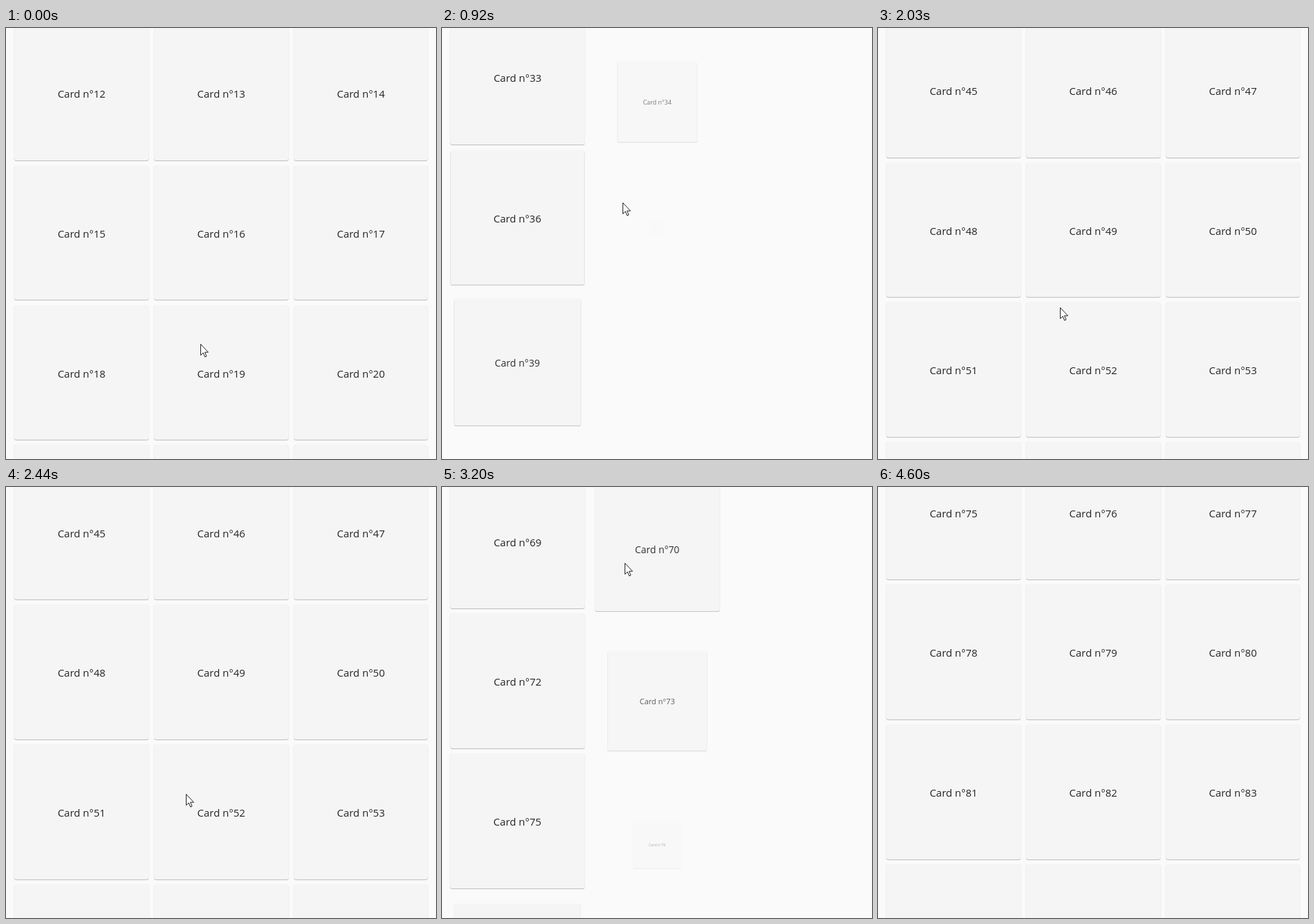
Write an HTML page that moves like this. It is 624 px wide and 625 px high and loops after 4660 ms.

```html
<!DOCTYPE html>
<html lang="en">
<head>
<meta charset="utf-8">
<style>
html, body { margin: 0; width: 100%; height: 100%; overflow: hidden; background: #fafafa; }
#stage { position: relative; width: 100%; height: 100%; overflow: hidden; }
.card {
  position: absolute; width: 194.667px; height: 194.667px; border-radius: 3px;
  background: #f5f5f5; color: #242424;
  box-shadow: 0 1px 1px rgba(0,0,0,.23), 0 0 2px rgba(0,0,0,.08);
  font: 15px/196px "Open Sans", "Noto Sans", sans-serif; text-align: center;
}
#pointer { position: absolute; left: 0; top: 0; z-index: 1; }
</style>
</head>
<body>
<div id="stage">
  <svg id="pointer" width="14" height="21">
    <path d="M.5.5V16.5L4.2 13L6.7 19L9 18L6.5 12.2H11.5Z" fill="#fff" stroke="#222"/>
  </svg>
</div>
<script>
const LOOP = 4660, PITCH = 202.667, FIRST_ROW = 3, LAST_ROW = 29;
const REVEAL = 250, ROW_DELAY = 56, COLUMN_DELAY = 200, SLIDE = 150;

// New rows arrive in pages of three, at these times
const FIRST_NEW_ROW = 8;
const pageTimes = [440, 656, 1010, 1300, 2640, 2855, 3050, 3400];

// Each flick is a pull that speeds up, then a cubic glide to rest
const flicks = [
  { start: 162, release: 370, end: 2531.8, from: 716.2, pull: 284.6, rest: 2974.3 },
  { start: 2460, release: 2620, end: 4194, from: 2974.3, pull: 274, rest: 5029.6 }
];

// Pointer path: time, x, y
const path = [
  [0, 282, 458], [162, 280, 458], [370, 268, 173], [920, 262, 253], [1500, 268, 350],
  [2440, 261, 447], [2620, 262, 173], [3200, 265, 110], [3750, 295, 334],
  [4290, 536, 581], [LOOP, 630, 640]
];

const clamp = v => Math.min(1, Math.max(0, v));

function scrollAt(t) {
  const { start, release, end, from, pull, rest } = flicks[t < flicks[1].start ? 0 : 1];
  if (t < release) return from + pull * clamp((t - start) / (release - start)) ** 2;
  return rest - (rest - from - pull) * clamp((end - t) / (end - release)) ** 3;
}

function pointerAt(t) {
  const i = path.findIndex(key => key[0] > t);
  const [t0, x0, y0] = path[i - 1], [t1, x1, y1] = path[i];
  const k = (t - t0) / (t1 - t0);
  return [x0 + (x1 - x0) * k, y0 + (y1 - y0) * k];
}

function revealAt(row, col, t) {
  const n = row - FIRST_NEW_ROW;
  if (n < 0) return 1;
  const start = pageTimes[Math.floor(n / 3)] + n % 3 * ROW_DELAY + col * COLUMN_DELAY;
  return 1 - (1 - clamp((t - start) / REVEAL)) ** 3;
}

const stage = document.getElementById("stage");
const pointer = document.getElementById("pointer");
const cards = [];
for (let row = FIRST_ROW; row <= LAST_ROW; row++) {
  for (let col = 0; col < 3; col++) {
    const el = document.createElement("div");
    el.className = "card";
    el.style.left = 12.3 + PITCH * col + "px";
    el.textContent = "Card n°" + (row * 3 + col);
    stage.append(el);
    cards.push({ el, row, col });
  }
}

function draw(now) {
  const t = now % LOOP, scroll = scrollAt(t);
  for (const { el, row, col } of cards) {
    const y = row * PITCH - 97.3 - scroll;
    const s = revealAt(row, col, t);
    const visible = s > 0 && y > -350 && y < 640;
    el.style.display = visible ? "" : "none";
    if (!visible) continue;
    el.style.top = y + "px";
    el.style.opacity = s;
    el.style.transform = s < 1 ? `scale(${s}) translateY(${SLIDE * (1 - s)}px)` : "none";
  }
  const [x, y] = pointerAt(t).map(Math.round);
  pointer.style.transform = `translate(${x}px, ${y}px)`;
}

function tick() {
  draw(performance.now());
  requestAnimationFrame(tick);
}
tick();
</script>
</body>
</html>
```
